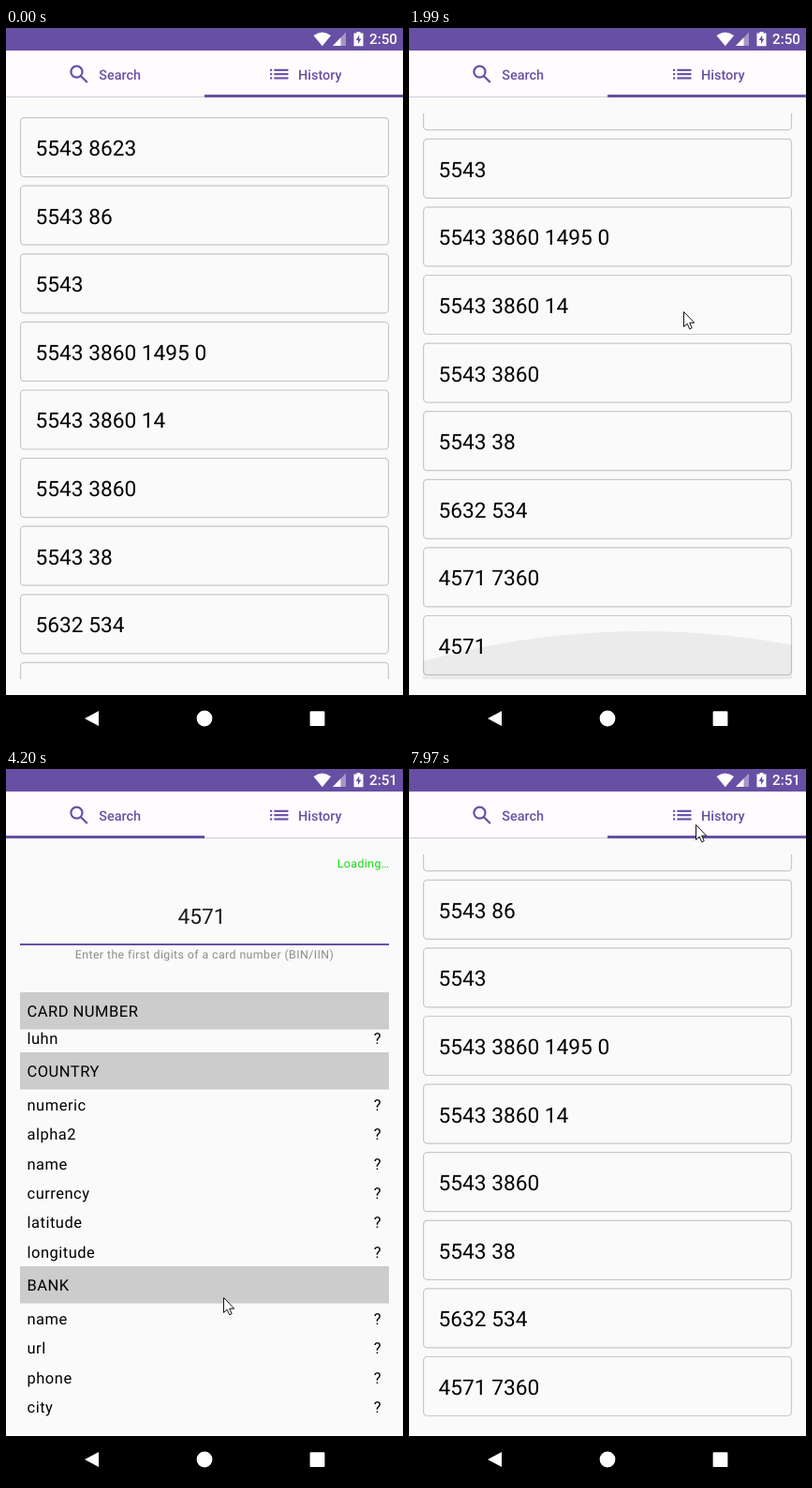
These frames come from a looping animation (424x760 px, 8000 ms). An HTML page with a canvas:

```html
<!DOCTYPE html>
<html lang="en">
<head>
<meta charset="utf-8">
<title>Card lookup</title>
<style>
  html, body { margin: 0; width: 100%; height: 100%; overflow: hidden; background: #fafafa; }
  canvas { display: block; }
</style>
</head>
<body>
<canvas width="424" height="760"></canvas>
<script>
const ctx = document.querySelector('canvas').getContext('2d');
const LOOP = 8000, WIDTH = 424, PURPLE = '#6750a4';
const SLOT = 72.6, SCROLL = 122.5, PAGE_STEP = 427;

const recent = ['5543 8623', '5543 86', '5543', '5543 3860 1495 0', '5543 3860 14',
  '5543 3860', '5543 38', '5632 534', '4571 7360', '4571'];
const reordered = ['4571', ...recent.slice(0, -1)];

const sections = [
  { title: 'CARD NUMBER', squeeze: 7, rows: [['luhn', 'Yes']] },
  { title: 'COUNTRY', rows: [['numeric', '208'], ['alpha2', 'DK'], ['name', 'Denmark'],
    ['currency', 'DKK'], ['latitude', '56', true], ['longitude', '10', true]] },
  { title: 'BANK', rows: [['name'], ['url'], ['phone'], ['city']] },
];

// Where the pointer goes: arrival time, place, travel time
const stops = [
  { by: 840, x: 288, y: 457, travel: 710 },
  { by: 1170, x: 294, y: 507, travel: 130 },
  { by: 1700, x: 293, y: 302 },
  { by: 2550, x: 52, y: 667 },
  { by: 3660, x: 153, y: 696 },
  { by: 4200, x: 232, y: 563 },
  { by: 5440, x: 196, y: 161, travel: 1170 },
  { by: 6110, x: 367, y: 66, travel: 200 },
  { by: 6470, x: 345, y: 53, travel: 290 },
  { by: 7970, x: 306, y: 59, travel: 200 },
];

const ramp = (t, from, to) => Math.min(1, Math.max(0, (t - from) / (to - from)));
const glide = (t, from, to) => 1 - (1 - ramp(t, from, to)) ** 2;
const between = (t, from, to) => t >= from && t < to;

function rect(x, y, w, h, color) {
  ctx.fillStyle = color;
  ctx.fillRect(x, y, w, h);
}
function circle(x, y, r, color) {
  ctx.fillStyle = color;
  ctx.beginPath();
  ctx.arc(x, y, r, 0, 7);
  ctx.fill();
}
function shape(path, color) {
  ctx.fillStyle = color;
  ctx.fill(new Path2D(path));
}
function text(str, x, y, size, { color = '#000', align = 'left', spacing = 0, weight = 400 } = {}) {
  ctx.font = `${weight} ${size}px Roboto, sans-serif`;
  ctx.textRendering = 'geometricPrecision';
  ctx.letterSpacing = spacing + 'px';
  ctx.textAlign = align;
  ctx.fillStyle = color;
  ctx.fillText(str, x, y);
}
function clipped(x, y, w, h, draw) {
  ctx.save();
  ctx.beginPath();
  ctx.rect(x, y, w, h);
  ctx.clip();
  draw();
  ctx.restore();
}
function moved(x, y, scale, draw) {
  ctx.save();
  ctx.translate(x, y);
  ctx.scale(scale, scale);
  draw();
  ctx.restore();
}

function drawSearch(t) {
  const loading = t < 4400;
  if (loading) {
    const green = 145 + 77 * ramp(t, 3710, 4200);
    text('Loading…', 409.5, 104.5, 12.375, { color: `rgb(10,${green},10)`, align: 'right', spacing: .41 });
  }
  text('4571', 183.5, 165, 22.69, { color: '#1c1b1f' });
  const caretOn = between(t, 4700, 7240) && Math.floor((t - 4700) / 510) % 2 === 0;
  if (caretOn) rect(184, 141, 2, 30, PURPLE);
  rect(15, 186, 394, 2, PURPLE);
  text('Enter the first digits of a card number (BIN/IIN)', 212, 201.5, 12.375,
    { color: '#8c8c8c', align: 'center', spacing: .41 });

  let y = 238;
  for (const { title, rows, squeeze = 0 } of sections) {
    rect(15, y, 394, 39.6, '#ccc');
    text(title, 22.5, y + 26.2, 16.5, { spacing: .5 });
    y += 39.6 - squeeze;
    for (const [label, value, link] of rows) {
      const known = value && !loading;
      const color = known && link ? '#0000ee' : '#000';
      text(label, 22.5, y + 22.2, 16.5, { spacing: .5 });
      text(known ? value : '?', 401, y + 22.2, 16.5, { color, align: 'right', spacing: .5 });
      if (known && link) rect(381, Math.round(y + 24), 20, 1, color);
      y += 31.4;
    }
  }
}

function drawItemRipple(t) {
  const grow = ramp(t, 2890, 3660), fade = 1 - ramp(t, 3780, 3990);
  if (grow && fade) clipped(32, 643, 360, 30, () => {
    rect(32, 643, 360, 30, `rgba(0,0,0,${.07 * fade})`);
    circle(52 + 62 * grow, 658, 66 * grow, `rgba(0,0,0,${.075 * fade})`);
  });
}

function drawOverscroll(t) {
  const size = ramp(t, 1530, 1790), alpha = .06 * (1 - ramp(t, 2890, 3030));
  if (size && alpha) clipped(15, 91, 394, 603, () =>
    circle(250, 694 - 51 * size + 880, 880, `rgba(0,0,0,${alpha})`));
}

function drawHistory(t) {
  const scroll = SCROLL * ramp(t, 1240, 1530);
  clipped(0, 91, WIDTH, 603, () => {
    drawItemRipple(t);
    ctx.strokeStyle = '#c8c8c8';
    ctx.lineWidth = 1.2;
    (t < 4300 ? recent : reordered).forEach((number, i) => {
      const y = 95.6 + i * SLOT - scroll;
      ctx.beginPath();
      ctx.roundRect(15.5, y, 393, 63, 4);
      ctx.stroke();
      text(number, 31.5, y + 40.4, 22.69);
    });
  });
  drawOverscroll(t);
}

function drawTabs(t) {
  rect(0, 24, WIDTH, 50, '#fffbff');
  rect(0, 73, WIDTH, 1, '#d0cbd6');

  const ripple = ramp(t, 7070, 7280), fade = 1 - ramp(t, 7400, 7700);
  if (ripple && fade) clipped(212, 24, 212, 50, () =>
    circle(345 - 27 * ripple, 50, 112 * ripple, `rgba(103,80,164,${.12 * fade})`));

  moved(65, 36.2, 1.1, () => {
    ctx.strokeStyle = PURPLE;
    ctx.lineWidth = 2;
    ctx.stroke(new Path2D('M15 9.5a5.5 5.5 0 1 1-11 0a5.5 5.5 0 1 1 11 0M13.6 13.6L19.8 19.8'));
  });
  text('Search', 99.2, 55, 14.44, { color: PURPLE, weight: 500 });

  moved(278.8, 36.2, 1.08, () => {
    for (let y = 7; y <= 15; y += 4) {
      rect(3, y, 2, 2, PURPLE);
      rect(7, y, 14, 2, PURPLE);
    }
  });
  text('History', 312.1, 55, 14.44, { color: PURPLE, weight: 500 });

  const side = 1 - glide(t, 3710, 3960) + glide(t, 7140, 7400);
  rect(212 * side, 71, 212, 3, PURPLE);
}

function drawSystemBars(t) {
  rect(0, 0, WIDTH, 24, PURPLE);
  shape('M328.5 8Q337.5 1 347 8L337.8 19.3Z', '#fff');
  shape('M349 19H363V4.5Z', 'rgba(255,255,255,.4)');
  shape('M349 19H357.5V10.2Z', '#fff');
  shape('M371.5 5.5H374.5V4H378.5V5.5H381.5V19.3H371.5Z', '#fff');
  shape('M377.2 7.5L373.7 13H376V17L379.4 11.4H377.2Z', PURPLE);
  text(t < 3900 ? '2:50' : '2:51', 418, 17.3, 15.2, { color: '#fff', align: 'right', weight: 500 });

  rect(0, 711, WIDTH, 49, '#000');
  shape('M84 736L99 728V744Z', '#fff');
  circle(212, 736, 8.4, '#fff');
  ctx.beginPath();
  ctx.roundRect(324.6, 728.3, 15.8, 15.8, 1.2);
  ctx.fill();
}

function drawCursor(t) {
  if (t < 130) return;
  let x = 377, y = 734;
  for (const stop of stops) {
    const u = glide(t, stop.by - (stop.travel ?? 480), stop.by);
    x += (stop.x - x) * u;
    y += (stop.y - y) * u;
  }
  const pressed = between(t, 1110, 1860) || between(t, 2600, 2890) || between(t, 7070, 7210);
  if (pressed) circle(x, y, 12, 'rgba(255,255,0,.5)');
  moved(x + .5, y + .5, 1, () => {
    const arrow = 'M0 0V16L3.7 12.7L6.2 18.3L8.7 17.2L6.2 11.7H11.2Z';
    shape(arrow, '#fff');
    ctx.strokeStyle = '#111';
    ctx.lineWidth = 1;
    ctx.stroke(new Path2D(arrow));
  });
}

function draw(t) {
  rect(0, 0, WIDTH, 760, '#fafafa');
  const slide = glide(t, 3596, 4046) - glide(t, 7210, 7660);
  if (slide > 0) moved(PAGE_STEP * (slide - 1), 0, 1, () => drawSearch(t));
  if (slide < 1) moved(PAGE_STEP * slide, 0, 1, () => drawHistory(t));
  drawTabs(t);
  drawSystemBars(t);
  drawCursor(t);
}

const start = performance.now();
function tick() {
  draw((performance.now() - start) % LOOP);
  requestAnimationFrame(tick);
}
tick();
</script>
</body>
</html>
```
